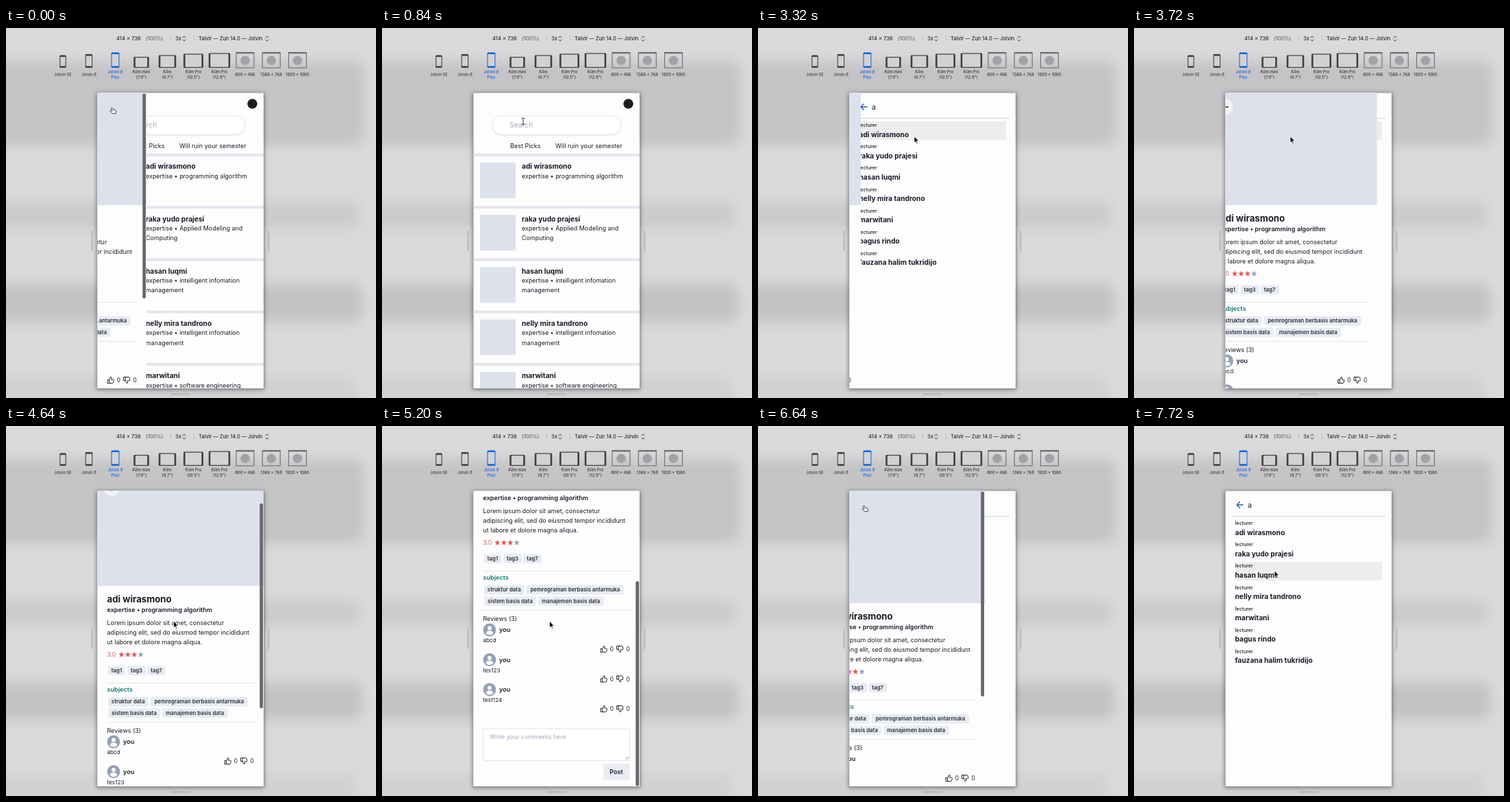
Animation, 540 px wide and 539 px high, one loop 8 s. Source, as an HTML page:

```html
<!DOCTYPE html>
<html lang="en">
<head>
<meta charset="utf-8">
<title>Responsive preview</title>
<style>
html, body { margin: 0; width: 100%; height: 100%; overflow: hidden; background: #d9d9db; }
svg { display: block; width: 540px; height: 539px; }
text { font-family: Inter, Roboto, sans-serif; white-space: pre; }
</style>
</head>
<body>
<svg id="stage" viewBox="0 0 540 539"></svg>
<script>
const LOOP = 8000, TICK = 40;
const INK = '#191d27', LINE = '#e5e7ec', CHIP = '#e8ebf1', PHOTO = '#dde1ec', BLUE = '#1667d9';
const people = ['adi wirasmono', 'raka yudo prajesi', 'hasan luqmi', 'nelly mira tandrono',
  'marwitani', 'bagus rindo', 'fauzana halim tukridijo'];
const fields = [['programming algorithm'], ['Applied Modeling and', 'Computing'],
  ['intelligent infomation', 'management'], ['intelligent infomation', 'management'],
  ['software engineering']];

// Drawing helpers
const text = (x, y, size, str, weight = 400, fill = INK, anchor = 'start') =>
  `<text x="${x}" y="${y}" font-size="${size}" font-weight="${weight}" fill="${fill}" text-anchor="${anchor}">${str}</text>`;
const rect = (x, y, w, h, fill, rx = 0, more = '') =>
  `<rect x="${x}" y="${y}" width="${w}" height="${h}" rx="${rx}" fill="${fill}" ${more}/>`;
const circle = (x, y, r, fill, more = '') => `<circle cx="${x}" cy="${y}" r="${r}" fill="${fill}" ${more}/>`;
const path = (d, stroke, width = 1, fill = 'none', move = '') =>
  `<path d="${d}" stroke="${stroke}" stroke-width="${width}" fill="${fill}" transform="${move}" stroke-linejoin="round" stroke-linecap="round"/>`;
const arrow = color => path('M159 115h-9m4.3-4.3L150 115l4.3 4.3', color, 1.3);

function chevrons(x) {
  return path(`M${x - 2} 14l2-2.2 2 2.2M${x - 2} 17l2 2.2 2-2.2`, '#444', 1);
}

function device(x, w, h, color, wide) {
  const [bx, by] = wide ? [2.6, 1.2] : [1.1, 2.6];
  return rect(x - w / 2, 58 - h, w, h, color, 1.6) +
    rect(x - w / 2 + bx, 58 - h + by, w - 2 * bx, h - 2 * by, '#d2d2d4');
}

function label(x, lines, color = '#38383b') {
  const top = lines.length > 1 ? 66.3 : 70.3;
  return lines.map((s, i) => text(x, top + 7.8 * i, 5.9, s, 500, color, 'middle')).join('');
}

function toolbar() {
  const dark = '#404044';
  const phones = [[83, 9.5, 18.5, ['Jolvin SE']], [121, 10.5, 20, ['Jolvin 8']], [159.5, 12, 22.5, ['Jolvin 8', 'Plus']]];
  const tablets = [[197.5, 22.5, 16, 'Kilm mini', '7.9'], [235.5, 25.5, 18.5, 'Kilm', '9.7'],
    [273.5, 29, 20.5, 'Kilm Pro', '10.5'], [311.5, 31.5, 21.5, 'Kilm Pro', '12.9']];
  const desktops = ['800 × 466', '1366 × 768', '1920 × 1080'];
  return text(161, 18.3, 7.6, '414 × 736', 500, '#2c2c2f') + text(204, 18.3, 7.5, '(100%)', 400, '#55555a') +
    text(247, 18.3, 7.5, '3x', 500, '#2c2c2f') + chevrons(260) +
    text(281, 18.3, 7.4, 'Talvir — Zun 14.0 — Jolvin', 500, '#2c2c2f') + chevrons(381) +
    rect(240, 11, 1, 9, '#bdbdc0') + rect(274, 11, 1, 9, '#bdbdc0') +
    phones.map(([x, w, h, name], i) => {
      const color = i == 2 ? BLUE : dark;
      return device(x, w, h, color) + label(x, name, color);
    }).join('') +
    tablets.map(([x, w, h, name, inch]) => device(x, w, h, dark, true) + label(x, [name, `(${inch}")`])).join('') +
    desktops.map((name, i) => {
      const x = 349 + 38.2 * i;
      return rect(x - 13, 35.5, 26, 22.5, 'none', 0, 'stroke="#626266"') +
        rect(x - 13, 35, 26, 2.4, '#707074') + circle(x, 47.3, 6.8, '#a2a2a6') + label(x, [name]);
    }).join('');
}

function backdrop() {
  const bands = [[48, 123, 543, '#c4c3c5'], [254, 37, 537, '#cbcacc'], [373, 55, 540, '#c2c2c4'], [508, 50, 532, '#d1d0d3']];
  return rect(0, 0, 540, 539, '#dadadc') +
    `<g filter="url(#soft)">${bands.map(([y, h, w, c]) => rect(-40, y, w + 20, h, c, 14)).join('')}</g>` +
    rect(124, 295, 2.6, 30, '#bfbfc2', 1.3) + rect(382, 295, 2.6, 30, '#bfbfc2', 1.3) +
    rect(240, 532, 29, 2.6, '#bcbcbf', 1.3);
}

function home() {
  return rect(133, 94, 243, 431, '#fdfdfe') + circle(359.5, 110.5, 7.2, '#1b1f23') +
    rect(161, 128, 187.5, 27, '#fff', 13.5, 'stroke="#e6e7eb" filter="url(#lift)"') +
    text(186, 145.3, 10.3, 'Search', 400, '#a7adba') +
    text(187, 175, 9.1, 'Best Picks') + text(253, 175, 9, 'Will ruin your semester') +
    fields.map((lines, i) => {
      const y = 183 + 76.2 * i;
      return rect(133, y, 243, 4, '#e4e6ed') + rect(143, y + 13, 52, 52, PHOTO) +
        text(204, y + 22.3, 10.2, people[i], 700) +
        text(204, y + 35.8, 8.95, 'expertise • ' + lines[0]) +
        (lines[1] ? text(204, y + 50, 8.95, lines[1]) : '');
    }).join('');
}

function search() {
  return rect(133, 94, 243, 431, '#fdfdfe') + arrow('#2157a6') + rect(143, 131, 224, 1, '#cfd2d6') +
    `<g id="hover">${rect(148, 136, 214, 27, '#ededed')}</g>` +
    `<g id="typed">${text(166, 119, 10.5, 'a')}</g><g id="results">` +
    people.map((name, i) => {
      const y = 144.2 + 31.1 * i;
      return text(147.5, y, 7.1, 'lecturer', 500) + text(147.5, y + 14.6, 10.2, name, 700);
    }).join('') + '</g>';
}

function star(x, y, color) {
  const points = Array.from({ length: 10 }, (_, i) => {
    const r = i % 2 ? 1.9 : 4.5, a = i * Math.PI / 5;
    return [x + r * Math.sin(a), y - r * Math.cos(a)].map(v => v.toFixed(2));
  });
  return `<polygon points="${points.join(' ')}" fill="${color}"/>`;
}

const chip = (x, y, w, str) => rect(x, y - 6.8, w, 13.6, CHIP, 2.8) + text(x + w / 2, y + 2.8, 7.85, str, 600, '#2b303b', 'middle');

function thumb(x, y, flip) {
  return path('M-4.5-.5h2.2v5h-2.2zM-2.3-.3L-.2-4.6q1.7 0 1.3 2l-.4 1.7h2.7q1.2.2 1 1.3l-.8 3.2q-.3.9-1.2.9h-4.7',
    '#222', 1, 'none', `translate(${x} ${y}) scale(1 ${flip})`);
}

function review(note, i) {
  const y = 485 + 43.5 * i;
  return circle(157, y, 9.4, '#94a1b6') + circle(157, y - 2.6, 2.9, '#fff') +
    path(`M151.6 ${y + 5.3}q.5-4 5.4-4t5.4 4q-5.4 4.6-10.8 0z`, 'none', 0, '#fff') +
    text(171, y + 3.3, 9.1, 'you', 600) + text(147.5, y + 18.2, 8.2, note) +
    thumb(324, y + 28, 1) + text(332.8, y + 31, 8.3, '0') +
    thumb(347.5, y + 28, -1) + text(356.5, y + 31, 8.3, '0');
}

function detail() {
  const lorem = ['Lorem ipsum dolor sit amet, consectetur', 'adipiscing elit, sed do eiusmod tempor incididunt',
    'ut labore et dolore magna aliqua.'];
  return rect(133, 94, 243, 431, '#fdfdfe') + '<g id="scroll">' + rect(133, 94, 243, 164, PHOTO) +
    circle(154, 115, 12, '#f0f2f6') + arrow('#222') +
    text(147.5, 281.7, 13.2, people[0], 700) +
    text(147.5, 296.4, 9.1, 'expertise • programming algorithm', 600) +
    lorem.map((s, i) => text(147.5, 315.2 + 14.1 * i, 8.98, s)).join('') +
    text(147.5, 361.2, 8.6, '3.0', 400, '#e25b5b') +
    [0, 1, 2, 3].map(i => star(168.5 + 9.4 * i, 358, i < 3 ? '#e45656' : '#96a2b7')).join('') +
    chip(149, 381.2, 25, 'tag1') + chip(177, 381.2, 27, 'tag3') + chip(206, 381.2, 27, 'tag7') +
    rect(148, 399, 214, 1, LINE) + text(147.5, 412.2, 9.1, 'subjects', 600, '#147a74') +
    chip(149, 426.6, 58.5, 'struktur data') + chip(211, 426.6, 142, 'pemrograman berbasis antarmuka') +
    chip(149, 443.2, 76, 'sistem basis data') + chip(228, 443.2, 95.5, 'manajemen basis data') +
    rect(148, 456, 214, 1, LINE) + text(147.5, 471.6, 8.95, 'Reviews (3)') +
    ['abcd', 'tes123', 'test124'].map(review).join('') +
    rect(148, 629, 213.5, 46.5, '#fff', 1, 'stroke="#dfe3e9"') +
    text(157, 643.8, 8.95, 'Write your comments here', 400, '#a3abb9') +
    path('M355.5 673.5l4-4M358 673.5l1.5-1.5', '#777', .7) +
    rect(323, 680, 38.5, 24, '#e9ecf2', 1) + text(342, 695.3, 9.1, 'Post', 600, INK, 'middle') + '</g>' +
    `<g id="bar">${rect(370.3, 95.5, 4.7, 298.5, '#68686b', 2.3)}</g>`;
}

function cursors() {
  return `<g id="arrow">${path('M0 0v9.2l2.1-1.9 1.5 3.4 1.5-.7-1.5-3.3h2.9z', '#fff', .8, '#000')}</g>` +
    `<g id="hand">${path('M-2.4-3.6q.8-1 1.7 0l1 2.7 3 .1q1.4.3 1.3 1.6l-.5 3.8h-5l-2.9-3.5q0-1.2 1.3-.8l1.1.7z', '#222', .8, '#fff')}</g>` +
    `<g id="beam">${path('M-2-5q2 0 2 1.2v7.6q0 1.2-2 1.2M2-5q-2 0-2 1.2m0 7.6q0 1.2 2 1.2', '#222', .9)}</g>`;
}

document.getElementById('stage').innerHTML = `<defs>
  <filter id="soft" x="-10%" y="-10%" width="120%" height="120%"><feGaussianBlur stdDeviation="9"/></filter>
  <filter id="shade" x="-10%" y="-10%" width="120%" height="120%"><feGaussianBlur stdDeviation="3"/></filter>
  <filter id="lift" x="-10%" y="-30%" width="120%" height="170%"><feDropShadow dx="0" dy="1" stdDeviation=".8" flood-opacity=".12"/></filter>
  <clipPath id="screen">${rect(133.5, 94.5, 242.5, 430.5, '#000')}</clipPath></defs>` +
  backdrop() + toolbar() +
  rect(132, 95, 245, 432, '#000', 1, 'opacity=".42" filter="url(#shade)"') +
  rect(133, 94, 243.5, 431.5, '#808083') +
  `<g clip-path="url(#screen)"><g id="home">${home()}</g><g id="search">${search()}</g><g id="detail">${detail()}</g></g>` +
  cursors();

// Motion: [time, value...] points joined by straight lines
const slide = [[0, -171], [40, -205], [80, -230], [120, -243], [3280, -243], [3320, -226], [3400, -180], [3520, -100],
  [3640, -40], [3720, -21.5], [3880, -21.5], [3920, -5], [3960, 0], [6560, 0], [6640, -45], [6760, -140], [6840, -200], [6920, -243]];
const scroll = [[4520, 0], [4560, 5], [4640, 25], [4760, 55], [4880, 55], [5160, 180], [5200, 188], [5280, 188], [5760, 77], [6080, 0]];
const pointer = [[320, 156, 120], [520, 206, 136], [1240, 206, 136], [1280, 208, 133], [2720, 208, 133], [3000, 228, 158],
  [3960, 228, 158], [4360, 244.5, 284.5], [6120, 244.5, 284.5], [6560, 156, 120], [7120, 156, 120], [7320, 192, 120],
  [7520, 192, 120], [7720, 205, 211]];

function at(keys, t) {
  const n = keys.findIndex(k => k[0] > t);
  if (n == 0) return keys[0].slice(1);
  if (n < 0) return keys[keys.length - 1].slice(1);
  const a = keys[n - 1], b = keys[n], p = (t - a[0]) / (b[0] - a[0]);
  return a.slice(1).map((v, i) => v + (b[i + 1] - v) * p);
}

const el = id => document.getElementById(id);
const show = (id, on) => el(id).style.display = on ? '' : 'none';
const move = (id, x, y) => el(id).setAttribute('transform', `translate(${x} ${y})`);

function frame() {
  const t = Math.floor(performance.now() % LOOP / TICK) * TICK;
  const [dx] = at(slide, t), [dy] = at(scroll, t), [x, y] = at(pointer, t);

  show('home', t < 1280);
  show('search', t >= 1280);
  show('typed', t >= 2240);
  show('results', t >= 2280);
  show('detail', dx > -243);
  show('bar', t < 200 || t >= 4520);
  move('detail', dx, 0);
  move('scroll', 0, -dy);
  move('bar', 0, dy * .694);

  const row = Math.floor((y - 136) / 31.1);
  show('hover', t >= 2280 && row >= 0 && row < people.length && y - 136 - row * 31.1 < 27);
  move('hover', 0, row * 31.1);

  const overBack = Math.hypot(x - 154, y - 117) < 13;
  const kind = overBack ? 'hand' : t < 1280 && y > 128 ? 'beam' : 'arrow';
  for (const id of ['arrow', 'hand', 'beam']) show(id, id == kind);
  move(kind, x, y);
  requestAnimationFrame(frame);
}
frame();
</script>
</body>
</html>
```
